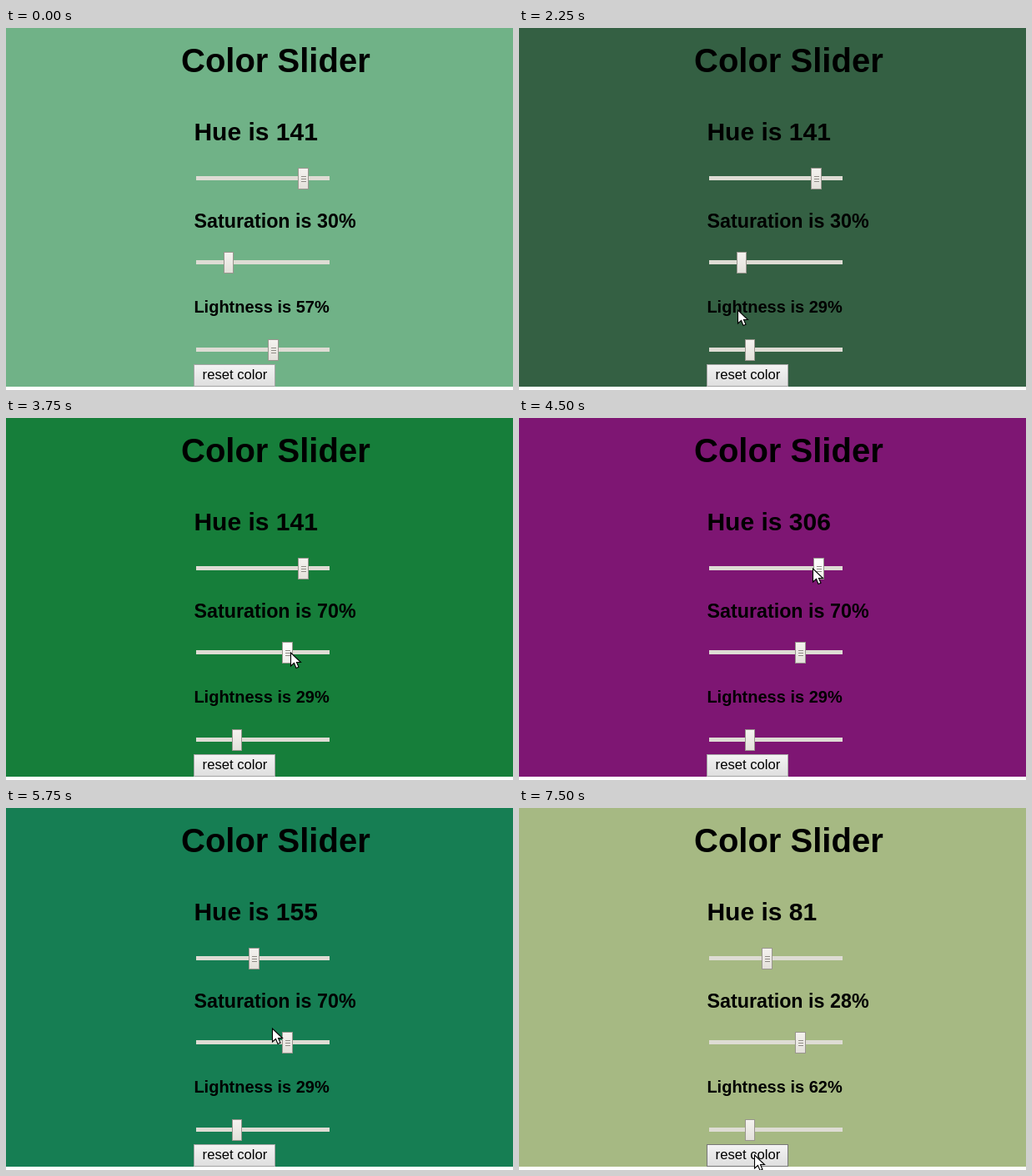
An HTML page with a canvas for the animation above (8000 ms loop, 608x435 px).

```html
<!DOCTYPE html>
<html lang="en">
<head>
<meta charset="utf-8">
<title>Color Slider</title>
<style>
  html, body { margin: 0; width: 100%; height: 100%; overflow: hidden; background: #fff; }
  canvas { display: block; }
</style>
</head>
<body>
<canvas id="stage" width="608" height="435"></canvas>
<script>
const ctx = document.getElementById('stage').getContext('2d');
const LOOP = 8000;
const sliders = [
  { key: 'hue', label: 'Hue', unit: '', max: 360, size: 30, baseline: 135, y: 180.5 },
  { key: 'sat', label: 'Saturation', unit: '%', max: 100, size: 23.3, baseline: 240, y: 281.5 },
  { key: 'light', label: 'Lightness', unit: '%', max: 100, size: 20, baseline: 342, y: 386.5 }
];

// Each step lists only what changes. Dragging moves a knob; a reset leaves the knobs alone.
const steps = [
  { at: 0, hue: 141, sat: 30, light: 57, cursor: null, button: 'idle' },
  { at: 500, cursor: [309, 392] },
  { at: 750, cursor: [319, 391] },
  { at: 1000, drag: { light: 54 }, cursor: [311, 387] },
  { at: 1250, drag: { light: 50 }, cursor: [305, 387] },
  { at: 1500, drag: { light: 29 }, cursor: [273, 390] },
  { at: 2250, cursor: [262, 338] },
  { at: 2500, cursor: [256, 294] },
  { at: 2750, cursor: [258, 292] },
  { at: 3000, cursor: [263, 288] },
  { at: 3250, drag: { sat: 37 }, cursor: [294, 284] },
  { at: 3500, drag: { sat: 65 }, cursor: [336, 282] },
  { at: 3750, drag: { sat: 70 }, cursor: [341, 281] },
  { at: 4000, cursor: [352, 196] },
  { at: 4250, cursor: [362, 184] },
  { at: 4500, drag: { hue: 306 }, cursor: [352, 180] },
  { at: 4750, drag: { hue: 230 }, cursor: [325, 180] },
  { at: 5000, drag: { hue: 167 }, cursor: [303, 181] },
  { at: 5500, cursor: [294, 181] },
  { at: 5750, drag: { hue: 155 }, cursor: [319, 264] },
  { at: 6000, cursor: null },
  { at: 6250, cursor: [282, 416], button: 'hover' },
  { at: 6500, button: 'pressed' },
  { at: 6750, hue: 81, sat: 28, light: 62, button: 'hover' }
];

function stateAt(time) {
  const state = { knobs: { hue: 357, sat: 267, light: 321 } };
  for (const { at, drag = {}, ...change } of steps) {
    if (at > time) break;
    Object.assign(state, change, drag);
    for (const { key, max } of sliders)
      if (key in drag) state.knobs[key] = Math.round(234 + 148 * drag[key] / max);
  }
  return state;
}

function text(string, x, y, size, weight = 'bold') {
  ctx.font = `${weight} ${size}px "Liberation Sans", Arial, sans-serif`;
  ctx.fillStyle = '#000';
  ctx.fillText(string, x, y);
}

function box(x, y, w, h, border, top, bottom) {
  const fill = ctx.createLinearGradient(0, y, 0, y + h);
  fill.addColorStop(0, top);
  fill.addColorStop(1, bottom);
  ctx.fillStyle = border;
  ctx.fillRect(x, y, w, h);
  ctx.fillStyle = fill;
  ctx.fillRect(x + 1, y + 1, w - 2, h - 2);
}

function knob(x, y, cursor) {
  const hover = cursor && Math.abs(cursor[0] - x) < 9 && Math.abs(cursor[1] - y) < 13;
  const grip = x > 290;
  const left = grip ? x - 7 : x - 6, top = Math.round(y - 13);
  box(left, top, grip ? 13 : 12, 26, '#9a968f', hover ? '#fff' : '#f5f3f0', hover ? '#f0eeea' : '#e3e0da');
  if (!grip) return;
  ctx.fillStyle = '#8f8b85';
  for (let i = 0; i < 3; i++) ctx.fillRect(left + 4, top + 10 + 3 * i, 6, 1);
}

function pointer(x, y) {
  const outline = [[0, 0], [0, 16], [4, 12.5], [6.5, 18.5], [9.5, 17.2], [7, 11.5], [12, 11.5]];
  ctx.beginPath();
  for (const [dx, dy] of outline) ctx.lineTo(x + dx + 0.5, y + dy + 1);
  ctx.closePath();
  ctx.fillStyle = '#fff';
  ctx.fill();
  ctx.strokeStyle = '#000';
  ctx.lineWidth = 1.1;
  ctx.stroke();
}

function draw(now) {
  const state = stateAt(now % LOOP);
  ctx.fillStyle = '#fff';
  ctx.fillRect(0, 0, 608, 435);
  ctx.fillStyle = `hsl(${state.hue}, ${state.sat}%, ${state.light}%)`;
  ctx.fillRect(0, 0, 608, 431);

  text('Color Slider', 210, 53, 40);
  for (const { key, label, unit, size, baseline, y } of sliders) {
    text(`${label} is ${state[key]}${unit}`, 225.4, baseline, size);
    ctx.fillStyle = '#dedcd4';
    ctx.fillRect(228, Math.round(y - 2.5), 160, 5);
    knob(state.knobs[key], y, state.cursor);
  }

  const shades = ['#f4f4f4', '#dedede'];
  if (state.button === 'pressed') shades.reverse();
  box(225, 404, 98, 27, state.button === 'hover' ? '#777' : '#a6a6a6', ...shades);
  text('reset color', 235.6, 422, 16.67, 'normal');

  if (state.cursor) pointer(...state.cursor);
  requestAnimationFrame(() => draw(performance.now()));
}
draw(0);
</script>
</body>
</html>
```
